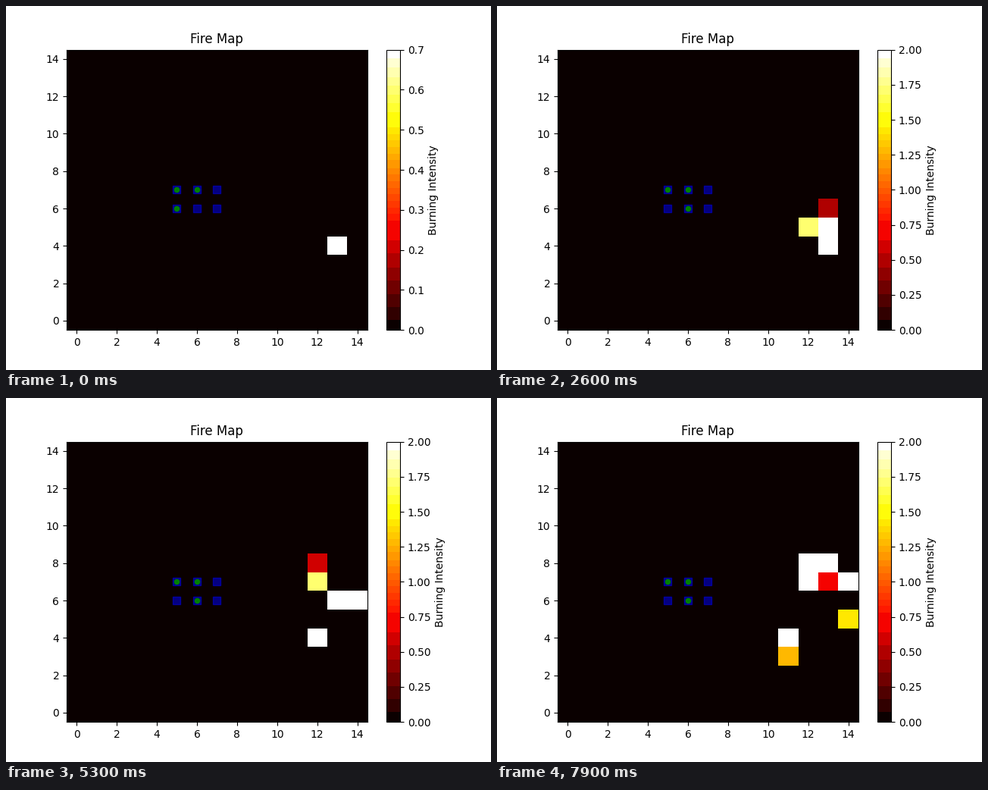
These frames come from a looping animation (640x480 px, 8 s). A matplotlib script:

```python
import matplotlib.pyplot as plt
import numpy as np
from matplotlib.animation import FuncAnimation
from matplotlib.colors import ListedColormap

SIZE, FRAMES, STEP_MS = 15, 80, 100
START, GROWTH, PEAK = 0.5, 0.1, 2.0
NEVER = 999

# (column, row, ignition step, burn-out step)
FIRES = [
    (13, 4, -2, 41), (13, 5, 11, 53), (12, 5, 14, 40), (14, 3, 22, 24),
    (13, 6, 26, 54), (11, 5, 30, 32), (14, 5, 31, 33), (12, 4, 38, 75),
    (14, 6, 38, 76), (12, 7, 41, NEVER), (12, 8, 52, NEVER),
    (11, 4, 54, NEVER), (14, 7, 54, NEVER), (13, 8, 61, NEVER),
    (14, 5, 70, NEVER), (11, 3, 71, NEVER), (13, 7, 77, NEVER),
]
HOUSES = [(x, y) for y in (6, 7) for x in (5, 6, 7)]
MOVE_STEP = 5


def banded_hot():
    """Hot colormap averaged over coarse red, green and blue steps."""
    colors = plt.get_cmap("hot")(np.arange(256))[:, :3]
    keys = (colors * 255).astype(int) // [32, 16, 32]
    out = colors.copy()
    for key in np.unique(keys, axis=0):
        band = (keys == key).all(axis=1)
        out[band] = colors[band].mean(axis=0)
    out[(keys == keys[0]).all(axis=1)] = colors[0]
    out[(keys == keys[-1]).all(axis=1)] = 1
    return ListedColormap(out)


def fire_map(step):
    grid = np.zeros((SIZE, SIZE))
    for x, y, lit, out in FIRES:
        if lit <= step < out:
            grid[y, x] = min(START + GROWTH * (step - lit), PEAK)
    return grid


def crew(step):
    third = (5, 6) if step < MOVE_STEP else (6, 6)
    return [(5, 7), (6, 7), third]


plt.rcParams["font.family"] = "DejaVu Sans"
fig, ax = plt.subplots(figsize=(6.4, 4.8), dpi=100)
image = ax.imshow(fire_map(0), cmap=banded_hot(), origin="lower",
                  aspect="auto", interpolation="nearest", vmin=0, vmax=0.7)
fig.colorbar(image, ax=ax, label="Burning Intensity")
ax.set_title("Fire Map")
ax.scatter(*zip(*HOUSES), s=50, c="blue", marker="s", alpha=0.5)
dots = ax.scatter(*zip(*crew(0)), s=20, c="green")
ax.set(xlim=(-0.5, SIZE - 0.5), ylim=(-0.5, SIZE - 0.5))


def update(step):
    grid = fire_map(step)
    image.set_data(grid)
    image.set_clim(0, round(grid.max(), 6))
    dots.set_offsets(crew(step))
    return image, dots


anim = FuncAnimation(fig, update, frames=FRAMES, interval=STEP_MS,
                     repeat=True, repeat_delay=0, blit=False)
plt.show()
```
